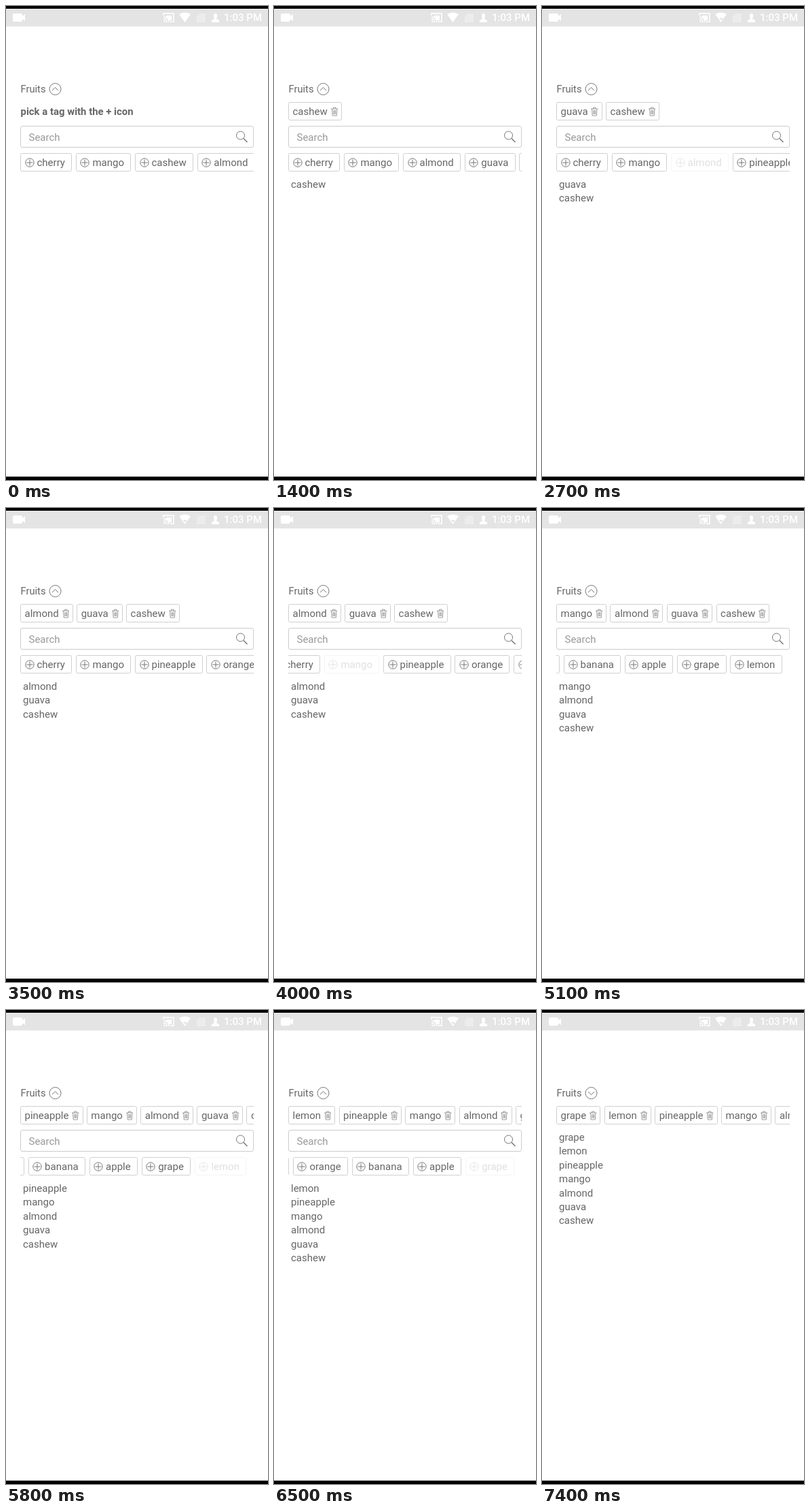
Animation of 386x696 px, one loop 8000 ms. Source, as an HTML page:

```html
<!DOCTYPE html>
<html lang="en">
<head>
<meta charset="utf-8">
<title>Tag picker</title>
<style>
  html, body { margin: 0; width: 100%; height: 100%; overflow: hidden; background: #fff; }
  body { position: relative; font: 15px/20.4px Roboto, sans-serif; color: #666; }
  body > * { position: absolute; box-sizing: border-box; white-space: nowrap; }
  svg { fill: none; stroke: #777; flex: none; }
  .bar { left: 0; width: 386px; background: #000; }
  #status { top: 4px; height: 26px; background: #e4e4e4; }
  #icons { left: 0; top: 0; }
  #clock { left: 321px; top: 7px; color: #fff; font-weight: 500; }
  #title { left: 21.5px; top: 112px; font-size: 14.7px; }
  #arrow { left: 63px; top: 112px; }
  #hint { left: 21.5px; top: 145px; font-weight: bold; font-size: 14.9px; }
  #search { left: 21px; top: 176px; width: 344px; height: 32px; border: 1px solid #ccc;
    border-radius: 3px; padding: 5.5px 11.5px; color: #999; }
  #search svg { position: absolute; right: 7px; top: 5px; }
  .row { left: 21px; width: 344px; height: 27px; overflow: hidden; }
  .row div { display: inline-flex; }
  .chip { display: flex; flex: none; align-items: center; box-sizing: border-box; height: 27px;
    border: 1px solid #d0d0d0; border-radius: 2.5px; }
  #chosen { top: 141px; }
  #chosen div { gap: 5.3px; }
  #chosen .chip { gap: 4.8px; padding: 1.4px 4.8px 0 5.5px; }
  #chosen svg { stroke: #858585; stroke-width: .8; }
  #offered { top: 216px; }
  #offered div { gap: 5.7px; }
  #offered .chip { gap: 4px; padding: 1.4px 9.3px 0 5.5px; }
  #names { left: 25px; white-space: pre; }
</style>
</head>
<body>
<div class="bar" style="top:0;height:4px"></div>
<div class="bar" id="status"></div>
<svg id="icons" width="386" height="30">
  <g fill="#fff" stroke="none">
    <path d="M12 11h10q2 0 2 2v2l4-3v10l-4-3v2q0 2-2 2H12q-2 0-2-2v-8q0-2 2-2z"/>
    <path d="M255 12q8.500-5 17 0l-8.500 12z"/>
    <path d="M285 11h9v13h-13v-9z" opacity=".3"/>
    <path d="M303 24v-3l4-2q-3-8 1.500-8t1.500 8l4 2v3z"/>
    <path d="M236 14h8v7h-4q-1-3-4-4z"/>
  </g>
  <path d="M232 14v-3h15v12h-5M232 22q2 0 2 2M232 19q5 0 5 5M232 16q8 0 8 8" stroke="#fff" stroke-width="1.500"/>
  <path id="mark" d="M261.500 19q2-2 4 0l-2 2" stroke="#ccc"/>
</svg>
<div id="clock">1:03 PM</div>
<div id="title">Fruits</div>
<svg id="arrow" width="20" height="20"><circle cx="9.500" cy="10" r="8.500"/><path d="M5 12l4.500-4.500L14 12"/></svg>
<div id="hint">pick a tag with the + icon</div>
<div id="search">Search<svg width="20" height="20"><circle cx="8.500" cy="8" r="6"/><path d="M13 12.500l5.500 5.500" stroke-width="1.500"/></svg></div>
<div class="row" id="chosen"><div></div></div>
<div class="row" id="offered"><div></div></div>
<div id="names"></div>
<div class="bar" style="top:691px;height:5px"></div>
<script>
const LOOP = 8000, COLLAPSE = 7400, SCROLL_START = 4000, SCROLL_TIME = 700;
const fruits = ['cherry', 'mango', 'cashew', 'almond', 'guava', 'pineapple',
  'orange', 'banana', 'apple', 'grape', 'lemon'];
// name, press time, time it joins the chosen tags
const picks = [
  ['cashew', 400, 1400], ['guava', 1600, 2600], ['almond', 2700, 3500], ['mango', 3600, 4500],
  ['pineapple', 4300, 5400], ['lemon', 5700, 6200], ['grape', 6400, 7200]
];
const plus = '<svg width="14" height="14"><circle cx="7" cy="7" r="6.2"/><path d="M2.500 7h9M7 2.500v9"/></svg>';
const trash = '<svg width="10.500" height="14"><path d="M0 3h10.500M3.500 3V1h3.500v2M1.500 3l.7 10h6.100l.7-10M3.800 5v6M5.300 5v6M6.800 5v6"/></svg>';

const $ = id => document.getElementById(id);
const chosenRow = $('chosen').firstChild, offeredRow = $('offered').firstChild;
const show = (element, on) => element.style.visibility = on ? 'visible' : 'hidden';
const chip = (content, opacity = 1) => `<span class="chip" style="opacity:${opacity}">${content}</span>`;

function scrollOffset(t) {
  const end = Math.max(0, offeredRow.offsetWidth - 333);
  if (t < SCROLL_START) return 0;
  const left = 1 - Math.min(1, (t - SCROLL_START) / SCROLL_TIME);
  return Math.min(end, 29 + (end - 29) * (1 - left * left));
}

let lastTime;
function draw(t) {
  const chosen = picks.filter(p => t >= p[2]).map(p => p[0]).reverse();
  const pressed = picks.filter(p => t >= p[1]).map(p => p[0]);
  const open = t < COLLAPSE;

  chosenRow.innerHTML = chosen.map(name => chip(name + trash)).join('');
  offeredRow.innerHTML = fruits.filter(name => !chosen.includes(name))
    .map(name => chip(plus + name, pressed.includes(name) ? 0.2 : 1)).join('');
  offeredRow.style.transform = `translateX(${-scrollOffset(t)}px)`;

  $('names').textContent = chosen.join('\n');
  $('names').style.top = (open ? 252 : 177) + 'px';
  $('arrow').style.transform = open ? '' : 'scaleY(-1)';
  show($('hint'), !chosen.length);
  show($('search'), open);
  show($('offered'), open);
  show($('mark'), t >= 2000);
}

function tick(now) {
  const t = Math.floor(now % LOOP / 100) * 100;
  if (t !== lastTime) draw(lastTime = t);
  requestAnimationFrame(tick);
}
draw(0);
requestAnimationFrame(tick);
</script>
</body>
</html>
```
